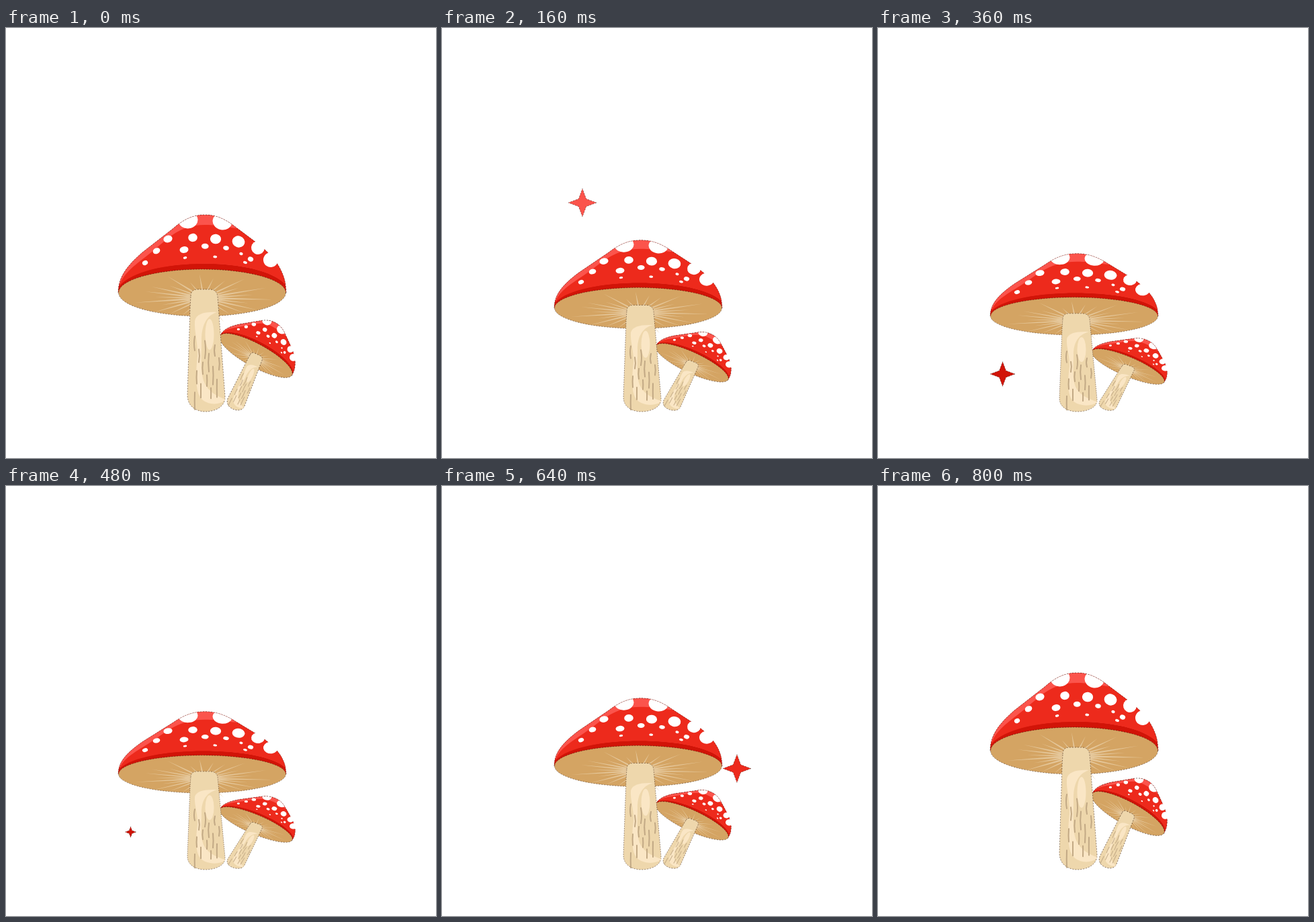
Write an HTML page with a canvas that moves like this. It is 640 by 640 pixels and loops after 1440 ms.

```html
<!DOCTYPE html>
<html lang="en">
<head>
<meta charset="utf-8">
<title>Mushrooms</title>
<style>
html, body { margin: 0; width: 100%; height: 100%; overflow: hidden; background: #fff; }
canvas { display: block; width: 100vmin; height: 100vmin; }
</style>
</head>
<body>
<canvas id="stage" width="640" height="640"></canvas>
<script>
const ctx = document.getElementById('stage').getContext('2d');
const LOOP = 1440, STEP = 40, BEAT = 800 / 3, GROUND = 571, SQUASH = 0.197;
const RED = '#ed2a1c', DARK = '#d11408', PINK = '#fb544c', WHITE = '#fff';
const GILL = '#d4a463', RAY = '#e5c79a', STEM = '#eed7ac', PALE = '#fae6c5', BARK = '#c2a985';
const HUB = { x: 292, y: 394 };   // centre of the gills

const CAP = new Path2D('M167 394C167 371 180 354 203 334L248 299C265 284 279 278 296 278C315 278 329 286 344 298L372 319C393 335 417 358 417 394Z');
const RIM = new Path2D('M160 270H430V390L416 382C380 340 205 340 168 383Z');
const FACE = new Path2D('M169 384C174 364 194 352 216 334C241 314 257 293 296 293C322 293 334 298 344 298L380 310L430 382H416C380 340 205 340 169 384Z');
const TRUNK = new Path2D('M275 399Q275 389 285 389H303Q314 389 315 400L326 548C327 565 309 571 297 571C284 571 270 564 270 546L274 416Z');
const SHINE = new Path2D('M281 436C283 425 297 422 314 423C297 428 291 445 291 465C291 490 289 508 294 525C300 541 314 548 327 553C318 562 301 561 292 553C280 543 283 507 285 488C286 469 280 452 281 436Z');

const wave = x => (1 - Math.cos(Math.PI * x)) / 2;
const clamp = x => Math.min(1, Math.max(0, x));
const mix = (a, b, k) => a + (b - a) * k;

function oval(x, y, rx, ry, turn = 0) {
  const p = new Path2D();
  p.ellipse(x, y, rx, ry, turn, 0, Math.PI * 2);
  return p;
}

function fill(p, color) {
  ctx.fillStyle = color;
  ctx.fill(p);
}

// thin broken contour
function edge(p, scale = 1) {
  ctx.save();
  ctx.lineWidth = 0.8 / scale;
  ctx.setLineDash([2 / scale, 2 / scale]);
  ctx.strokeStyle = 'rgba(40,15,8,.6)';
  ctx.stroke(p);
  ctx.restore();
}

// n spots from a to b; the row is lifted by sag in the middle
function row(n, a, b, sag, r0, r1, flat) {
  for (let i = 0; i < n; i++) {
    const k = i / (n - 1), r = mix(r0, r1, k);
    const x = mix(a[0], b[0], k);
    const y = mix(a[1], b[1], k) - sag * 4 * k * (1 - k);
    fill(oval(x, y, r, r * flat, (x - HUB.x) * 0.006), WHITE);
  }
}

function spots() {
  row(2, [271, 286], [322, 288], 0, 14.5, 14.5, 0.86);
  row(3, [207, 349.5], [241, 314], 0, 4.3, 6.7, 0.8);
  row(3, [278, 312], [346, 318], 1, 6.8, 9.5, 0.9);
  row(3, [265, 330], [327.5, 327.5], 4, 6.5, 4.3, 0.75);
  row(3, [266.5, 342], [356, 349], 5, 2.8, 3, 0.65);
  row(2, [350, 336], [364, 344], 0, 2.6, 4.2, 0.85);
}

function rays(count) {
  const x = HUB.x + 2, y = HUB.y + 8;
  ctx.fillStyle = RAY;
  ctx.beginPath();
  for (let i = 0; i < count; i++) {
    const a = Math.PI * 2 * (i + 0.25) / count;
    const k = 0.82 + 0.18 * Math.cos(i * 2.6);
    const ex = Math.cos(a) * 104 * k, ey = Math.sin(a) * 38 * k;
    const w = 1.7 / Math.hypot(ex, ey);
    ctx.moveTo(x - ey * w, y + ex * w);
    ctx.lineTo(x + ex, y + ey);
    ctx.lineTo(x + ey * w, y - ex * w);
  }
  ctx.fill();
}

function bark(count) {
  ctx.lineWidth = 2;
  ctx.lineCap = 'round';
  ctx.strokeStyle = BARK;
  ctx.beginPath();
  for (let i = 0; i < count; i++) {
    const x = 281 + (i * 5 % 13) * 3, y = 459 + i * 6.4;
    const len = 21 + 6 * Math.sin(i * 2), bend = 2 * Math.cos(i * 3);
    ctx.moveTo(x, y);
    ctx.quadraticCurveTo(x - bend, y + len / 2, x, y + len);
  }
  ctx.stroke();
}

function cap(scale) {
  fill(CAP, DARK);
  ctx.save();
  ctx.clip(CAP);
  fill(RIM, PINK);
  fill(FACE, RED);
  spots();
  ctx.restore();
  edge(CAP, scale);
  // these two break through the outline
  row(2, [375, 327], [394, 345], 0, 10, 11, 1);
  const gills = oval(HUB.x, HUB.y, 124.5, 35);
  fill(gills, GILL);
  edge(gills, scale);
  rays(26);
}

function stem(scale) {
  fill(TRUNK, STEM);
  edge(TRUNK, scale);
  fill(SHINE, PALE);
  fill(oval(303, 456, 6.5, 23), PALE);
  bark(14);
}

function mushroom(x, y, scale, capTurn, stemTurn) {
  for (const [part, turn] of [[cap, capTurn], [stem, stemTurn]]) {
    ctx.save();
    ctx.translate(x, y);
    ctx.rotate(turn);
    ctx.scale(scale, scale);
    ctx.translate(-HUB.x, -HUB.y);
    part(scale);
    ctx.restore();
  }
}

const sparks = [[209, 260, PINK], [185.5, 515, DARK], [439, 420.5, RED]];

function spark(t) {
  const i = Math.floor(t / BEAT);
  if (i >= sparks.length) return;
  const [x, y, color] = sparks[i];
  const r = 23 * wave(2 * (t / BEAT - i));
  if (r < 0.2) return;
  const p = new Path2D();
  for (let k = 0; k < 8; k++) {
    const d = k % 2 ? r * 0.385 : r, a = k * Math.PI / 4;
    p.lineTo(x + d * Math.cos(a), y + d * Math.sin(a));
  }
  p.closePath();
  fill(p, color);
  edge(p);
}

function draw(t) {
  const s = 1 - SQUASH * (wave(clamp(t / BEAT)) - wave(clamp(t / BEAT - 2)));
  fill(oval(320, 320, 640, 640), WHITE);
  ctx.save();
  ctx.translate(0, GROUND * (1 - s));
  ctx.scale(1, s);
  mushroom(372, 487.5, 0.49, 0.5, 0.44);
  mushroom(HUB.x, HUB.y, 1, 0, 0);
  ctx.restore();
  spark(t);
}

const start = performance.now();
function tick() {
  const t = (performance.now() - start) % LOOP;
  draw(Math.floor(t / STEP) * STEP);
  requestAnimationFrame(tick);
}
tick();
</script>
</body>
</html>
```
